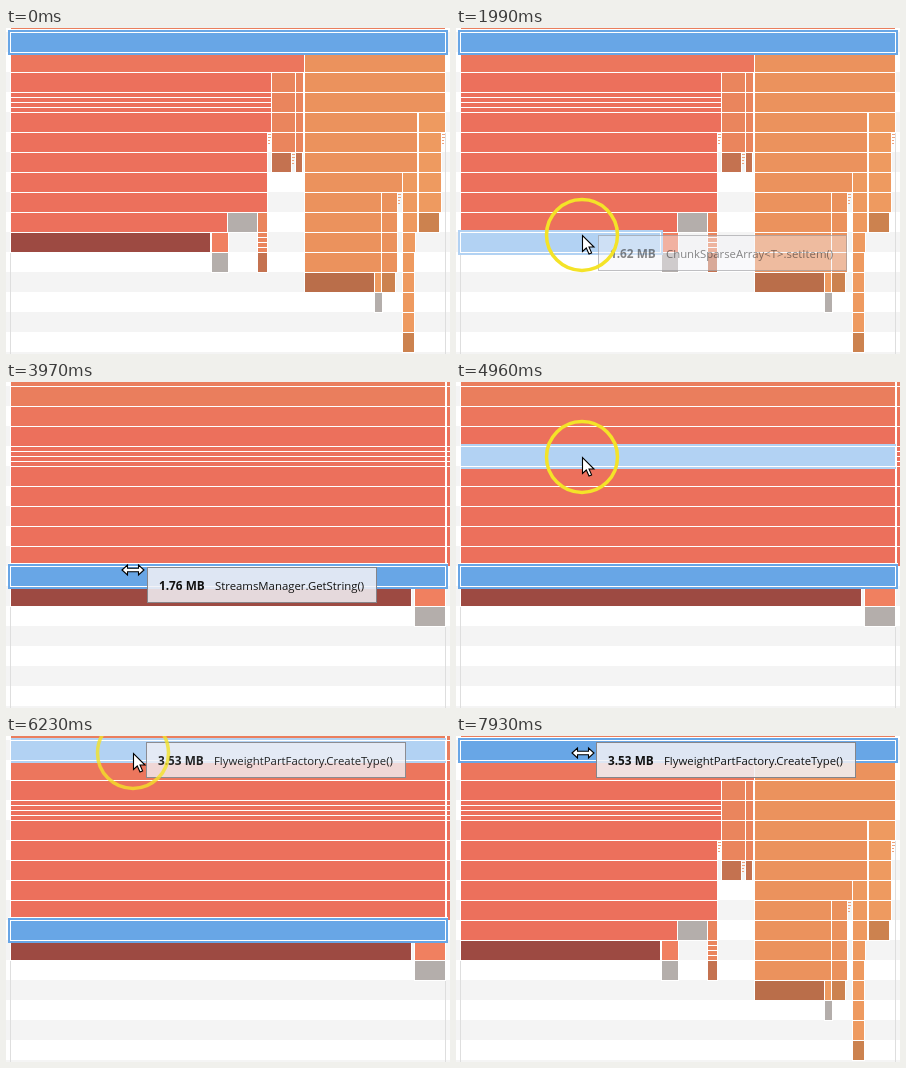
An HTML page with a canvas for the animation above (8 s loop, 444 by 326 pixels).

```html
<!DOCTYPE html>
<html lang="en">
<head>
<meta charset="utf-8">
<title>Flame chart zoom</title>
<style>
  html, body { margin: 0; width: 100%; height: 100%; overflow: hidden; background: #fff; }
  canvas { display: block; width: 444px; height: 326px; }
</style>
</head>
<body>
<canvas id="stage" width="444" height="326"></canvas>
<script>
const ctx = document.getElementById('stage').getContext('2d');
const LOOP = 8000, TICK = 1000 / 7.06;
const LEFT = 5, RIGHT = 439, ROW = 20;
const SELECTED = '#68a6e6', HOVER = '#b2d2f3';

const COLORS = {
  top: '#ea7e5d', first: '#ec765d', red: '#ec705c', dark: '#9d4a42', coral: '#f08060',
  mid: '#ea855d', orange: '#eb925d', amber: '#ee9a60',
  brown: '#c47250', rust: '#ba6e4a', tan: '#cc824f', grey: '#b4aeab'
};

// colour, left, right, first row, last row
const BLOCKS = [
  ['top', 5, 439, -1, 0], ['first', 5, 298, 1, 1], ['red', 5, 265, 2, 4],
  ['red', 5, 261, 5, 8], ['red', 5, 221, 9, 9], ['dark', 5, 204, 10, 10],
  ['coral', 206, 222, 10, 10], ['grey', 206, 222, 11, 11], ['grey', 222, 251, 9, 9],
  ['mid', 252, 261, 9, 10], ['brown', 252, 261, 11, 11],
  ['mid', 266, 289, 2, 5], ['brown', 266, 285, 6, 6],
  ['mid', 290, 297, 2, 5], ['brown', 290, 296, 6, 6],
  ['orange', 299, 439, 1, 3], ['orange', 299, 411, 4, 6], ['orange', 299, 396, 7, 7],
  ['orange', 299, 375, 8, 11], ['rust', 299, 368, 12, 12],
  ['amber', 369, 375, 12, 12], ['grey', 369, 376, 13, 13],
  ['orange', 376, 391, 8, 11], ['tan', 376, 389, 12, 12],
  ['amber', 397, 411, 7, 9], ['amber', 397, 409, 10, 10],
  ['amber', 397, 408, 11, 14], ['tan', 397, 408, 15, 15],
  ['amber', 413, 439, 4, 4], ['amber', 413, 435, 5, 8], ['tan', 413, 433, 9, 9]
];

// Tiny stacks of calls: x, row
const STACKS = [[262, 5], [286, 6], [392, 8], [436, 5]];

// tick, x, y of the pointer
const PATH = [
  [3, 130, 10], [5, 128, 110], [7, 126, 200], [8, 126, 213], [13, 126, 213], [17, 127, 188],
  [32, 127, 188], [33, 127, 165], [36, 125, 30], [40, 125, 30], [42, 127, 17]
];

// Opacity of each tick from start; the last value holds until end
const TIPS = [
  { start: 10, end: 14, fade: [.45, .75, 1], x: 142, y: 207, w: 249,
    size: '1.62 MB', name: 'ChunkSparseArray<T>.setItem()' },
  { start: 19, end: 30, fade: [.4, .7, .93, 1], x: 141, y: 185, w: 230,
    size: '1.76 MB', name: 'StreamsManager.GetString()' },
  { start: 37, end: 40, fade: [.5, .93, 1], x: 140, y: 23, w: 236,
    size: '2.38 MB', name: 'PartHelpers.CreateMembers()' },
  { start: 44, end: 99, fade: [.92, 1], x: 140, y: 6, w: 260,
    size: '3.53 MB', name: 'FlyweightPartFactory.CreateType()' }
];

const rowY = row => 5 + row * ROW;

function rect(color, x, y, w, h) {
  ctx.fillStyle = color;
  ctx.fillRect(x, y, w, h);
}

function pointerAt(k) {
  const i = PATH.findIndex(p => p[0] > k);
  if (i < 0) return PATH[PATH.length - 1].slice(1);
  const a = PATH[i - 1], b = PATH[i], f = (k - a[0]) / (b[0] - a[0]);
  return [1, 2].map(n => Math.round(a[n] + (b[n] - a[n]) * f));
}

function background() {
  rect('#fff', 0, 0, 444, 326);
  for (let y = 4; y < 326; y += 2 * ROW) rect('#f4f4f4', 0, y, 444, ROW);
  rect('#dedede', 4, 0, 1, 326);
  rect('#dedede', 439, 0, 1, 326);
}

function cell(color, x0, x1, row, split) {
  const y = rowY(row), w = x1 - x0;
  rect('#fff', x0 - 1, y - 1, w + 2, ROW + 1);
  rect(color, x0, y, w, ROW - 1);
  if (split) for (let d = 4; d < 19; d += 5) rect('#fff', x0, y + d, w, 1);
}

function chart(zoomed) {
  const scale = zoomed ? (RIGHT - LEFT) / 216 : 1;
  const place = x => Math.round(LEFT + (x - LEFT) * scale);
  for (const [color, a, b, first, last] of BLOCKS) {
    const x0 = place(a), x1 = place(b);
    if (x0 >= RIGHT) continue;
    for (let row = first; row <= last; row++) {
      const split = (a === LEFT && row === 3) || (a === 252 && row === 10);
      if (x1 > 444) cell(COLORS[color], 441, 446, row, split);
      cell(COLORS[color], x0, Math.min(x1, RIGHT), row, split);
    }
  }
  if (zoomed) return;
  for (const [x, row] of STACKS)
    for (let i = 0; i < 4; i++) rect('#eda27c', x, rowY(row) + 1 + i * 3, i < 2 ? 3 : 2, 1);
}

function frame(color, x1, row) {
  const y = rowY(row), w = x1 - LEFT;
  rect(color, LEFT - 3, y - 3, w + 6, ROW + 5);
  rect('#fff', LEFT - 1, y - 1, w + 2, ROW + 1);
  rect(color, LEFT, y, w, ROW - 1);
}

function hover(row, selected, zoomed) {
  if (row === selected) return;
  const block = BLOCKS.find(b => b[1] === LEFT && b[3] <= row && row <= b[4]);
  if (!block) return;
  ctx.save();
  if (zoomed) {
    ctx.beginPath();
    ctx.rect(LEFT, 0, 435, 326);
    ctx.clip();
  }
  frame(HOVER, zoomed ? RIGHT : block[2], row);
  ctx.restore();
}

function tooltip(k) {
  const tip = TIPS.find(t => k >= t.start && k <= t.end);
  if (!tip) return;
  const { x, y, w, fade } = tip;
  const shown = fade[Math.min(k - tip.start, fade.length - 1)];
  ctx.save();
  ctx.globalAlpha = k === tip.end ? .5 : shown;
  rect('rgba(241,241,246,.86)', x, y, w, 36);
  ctx.strokeStyle = '#85858a';
  ctx.lineWidth = 1;
  ctx.strokeRect(x + .5, y + .5, w - 1, 35);
  ctx.fillStyle = '#111';
  ctx.font = 'bold 11.8px "Open Sans", "Noto Sans", sans-serif';
  ctx.fillText(tip.size, x + 12, y + 23);
  ctx.font = '11.36px "Open Sans", "Noto Sans", sans-serif';
  ctx.fillText(tip.name, x + 68, y + 23);
  ctx.restore();
}

function ringAlpha(k) {
  if (k >= 53) return Math.max(0, (56 - k) / 4);
  if (k >= 25 && k < 33) return Math.max(0, (28 - k) / 4);
  return k === 44 ? .8 : 1;
}

function ring(x, y, alpha) {
  ctx.save();
  ctx.globalAlpha = alpha;
  ctx.strokeStyle = '#f4e328';
  ctx.lineWidth = 3.5;
  ctx.beginPath();
  ctx.arc(x, y, 35.5, 0, 7);
  ctx.stroke();
  ctx.restore();
}

const ARROW = new Path2D('M.5 .5V16.5L4.3 13L7 19L9.6 17.9L7 12H12Z');
const RESIZE = new Path2D('M-11 0L-5.5-5V-1.8H5.5V-5L11 0L5.5 5V1.8H-5.5V5Z');

function cursor(x, y, shape) {
  ctx.save();
  ctx.translate(x, y);
  ctx.fillStyle = '#fff';
  ctx.strokeStyle = '#000';
  ctx.lineWidth = 1.1;
  ctx.fill(shape);
  ctx.stroke(shape);
  ctx.restore();
}

function draw(time) {
  const k = Math.floor((time % LOOP + 5) / TICK);
  const zoomed = k >= 23 && k < 51;
  const selected = zoomed ? 9 : 0;
  background();
  chart(zoomed);
  rect('#fff', LEFT - 3, rowY(selected) - 4, 440, 1);
  frame(SELECTED, RIGHT, selected);
  if (k < 3) return;

  const [x, y] = pointerAt(k);
  const pressed = (k >= 20 && k < 33) || k >= 49;
  hover(Math.floor((y - 4) / ROW), selected, zoomed);
  tooltip(k);
  ring(x, y, ringAlpha(k));
  cursor(x, y, pressed ? RESIZE : ARROW);
}

const start = performance.now();
function tick() {
  draw(performance.now() - start);
  requestAnimationFrame(tick);
}
tick();
</script>
</body>
</html>
```
